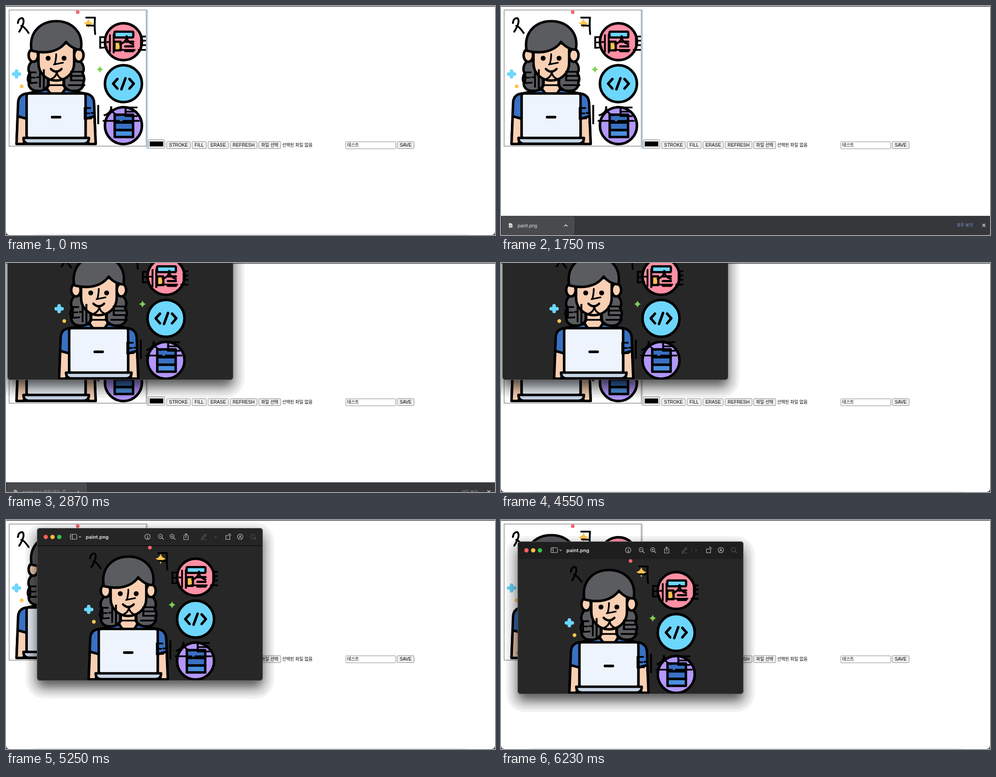
An HTML page that plays this animation: 1091 px wide and 513 px high, repeating every 6720 ms.

```html
<!DOCTYPE html>
<html lang="ko">
<head>
<meta charset="utf-8">
<title>Paint board</title>
<style>
html, body { margin: 0; width: 100%; height: 100%; overflow: hidden; background: #fff; }
svg { display: block; width: 1091px; height: 513px; }
text { font-family: "Liberation Sans", "Noto Sans CJK KR", sans-serif; }
.ko { font-family: "Noto Sans CJK KR", "Noto Sans CJK", sans-serif; }
.ui { font-family: Inter, "Noto Sans CJK KR", sans-serif; }
.line { fill: none; stroke-linecap: round; stroke-linejoin: round; }
</style>
</head>
<body>
<svg id="stage" viewBox="0 0 1091 513"></svg>
<script>
const LOOP = 6720, STEP = 70;
const SKIN = '#f9d0b4', HAIR = '#5b5c60', BLUE = '#3971c3', CYAN = '#6dd6fd', YELLOW = '#ffc350';
const W = 504, H = 342;

const rect = (x, y, w, h, fill, extra = '') =>
  `<rect x="${x}" y="${y}" width="${w}" height="${h}" fill="${fill}" ${extra}/>`;
const dot = (x, y, r, fill, extra = '') => `<circle cx="${x}" cy="${y}" r="${r}" fill="${fill}" ${extra}/>`;
const shape = (d, fill) => `<path d="${d}" fill="${fill}"/>`;
const line = (d, width, color = '#000') =>
  `<path class="line" d="${d}" stroke="${color}" stroke-width="${width}"/>`;
const text = (x, y, size, str, cls = '', extra = '') =>
  `<text x="${x}" y="${y}" font-size="${size}" class="${cls}" ${extra}>${str}</text>`;
const mirror = s => s + `<g transform="matrix(-1 0 0 1 223.5 0)">${s}</g>`;
const sparkle = (x, y, r, fill) =>
  shape(`M${x} ${y - r}Q${x + r * .2} ${y - r * .2} ${x + r} ${y}Q${x + r * .2} ${y + r * .2} ${x} ${y + r}` +
    `Q${x - r * .2} ${y + r * .2} ${x - r} ${y}Q${x - r * .2} ${y - r * .2} ${x} ${y - r}Z`, fill);

function drawArt() {
  const person = `<g stroke="#000" stroke-width="5.600" stroke-linejoin="round" stroke-linecap="round">` +
    shape('M23.500 309L27 216Q28 197 50 195.500L88 187H135L173 195.500Q195 197 196.500 216L200 309Z', BLUE) +
    mirror(
      shape('M26 247L46 252.500V296L38 309H23.500Z', SKIN) +
      shape('M62 122C49 128 48 144 53 150C48 158 48 166 51 171C49 183 60 191 70 190C80 192 90 186 94 178V124Z', HAIR)) +
    shape('M95 160V178L91 184Q97 196 104 199H120Q127 196 132.500 184L128.500 178V160Z', SKIN) +
    mirror(`<ellipse cx="61" cy="110.500" rx="10.500" ry="14.500" fill="${SKIN}"/>`) +
    shape('M72.500 98V128C72.500 152 92 167 111.700 167C132 167 152 152 152 128V90L112 75Z', SKIN) +
    shape('M57 100C50 57 79 34 112 34C145 34 174 57 167 98Q148 97 134 80.500C118 103 88 108 57 100Z', HAIR) +
    rect(46, 196, 131.500, 100, '#eef4fe', 'rx="5"') +
    line('M103 249H120.500', 6) +
    shape('M39 295.500H185Q185 308.500 173 308.500H51Q39 308.500 39 295.500Z', '#c7d5e6') + '</g>' +
    mirror(dot(94, 117, 5.500, '#000')) +
    line('M100 141Q112 153 124 141', 5) +
    line('M112 108Q112 118 109 130M107 131L127 127', 3.800);

  const badge = (y, fill) => dot(262, y, 41.300, fill, 'stroke="#000" stroke-width="5.800"');
  const icons =
    badge(80, '#ff8fa4') +
    `<g stroke="#000" stroke-width="5">` + rect(242, 57.500, 42, 13, CYAN, 'rx="2"') +
    rect(242, 80, 14, 19.500, YELLOW, 'rx="1"') + '</g>' +
    line('M266 80H284M266 90.500H284M266 101H284', 5) +
    badge(174, CYAN) +
    line('M248.500 163.500L239 174L248.500 185M266.500 162L257.500 186.500M275.500 163.500L285 174L275.500 185', 5.600) +
    badge(268, '#b397fb') +
    `<g stroke="#000" stroke-width="5.500" stroke-linejoin="round">` +
    rect(242.500, 243.500, 41, 17.500, BLUE) + rect(242.500, 261, 41, 17, BLUE) +
    rect(242.500, 278, 41, 15.500, '#4b8fdd') + '</g>';

  const bits =
    dot(160, 13.700, 4.200, '#f4646f') + dot(35, 180, 4.200, YELLOW) +
    sparkle(184, 39, 11.500, YELLOW) + sparkle(209.500, 142, 8, '#7fd152') +
    line('M23.500 146V158.500M17 152.500H30', 8, CYAN);

  const scrawl =
    line('M26.500 38L28 32Q31 27 36 27Q40 29 39 37Q36 48 29.500 57.500M34 44.500Q40 45 50.500 60.500', 4.200) +
    line('M179 26H198.500Q197 45 199 63M180.500 43.500L195 44', 4.200);
  const words = [[48.500, 180], [204.500, 101], [170, 260]]
    .map(([x, y]) => text(x, y, 46, '테스트', 'ko', 'letter-spacing="1.500" stroke="#000" stroke-width=".6"')).join('');
  return bits + person + icons + scrawl + words;
}

function button(x, w, label, id = '') {
  const ko = /[가-힣]/.test(label);
  return rect(x, 303.800, w, 15.700, '#efefef', `rx="2" stroke="#767676" stroke-width=".9" id="${id}"`) +
    text(x + w / 2, 315.100, ko ? 9.700 : 10.200, label, ko ? 'ko' : '', 'text-anchor="middle"');
}

function drawPage() {
  return rect(0, 0, 1091, 513, '#fff') + rect(0, 0, 1091, 1.500, '#48484a') +
    rect(313, 8, 3.800, 312, '#b9d6f2', 'id="strip"') +
    rect(7, 9, 306, 305, '#fff', 'stroke="#aaa" stroke-width="2"') +
    '<use href="#art" clip-path="url(#board)"/>' +
    rect(317.300, 299.500, 37, 19.500, '#efefef', 'rx="2" stroke="#767676" stroke-width=".9"') +
    rect(320.800, 303.600, 30, 11, '#000', 'stroke="#777" stroke-width=".8"') +
    button(358.300, 53, 'STROKE') + button(415.200, 31.700, 'FILL') +
    button(450.700, 45.500, 'ERASE', 'erase') + button(500.200, 60, 'REFRESH') +
    button(563.700, 49.300, '파일 선택') + text(616, 315.100, 9.700, '선택된 파일 없음', 'ko') +
    rect(758.300, 304.200, 111, 15.700, '#fff', 'rx="1" stroke="#767676" stroke-width=".9"') +
    text(761, 315.100, 9.700, '테스트', 'ko') + button(872.700, 37.800, 'SAVE');
}

function drawShelf() {
  return rect(0, 470, 1091, 43, '#35373b') + rect(0, 470, 1091, .8, '#4b4d51') +
    rect(2, 471, 160, 42, '#484a4e', 'id="hover"') +
    `<g id="file">` + shape('M17.500 486.500H22.500L25.500 489.500V496.500H17.500Z', '#dfe1e5') +
    line('M19.500 491.500H23.500M19.500 494H23.500', .9, '#5f6368') + '</g>' +
    dot(21.500, 491.500, 9.500, 'none', 'id="ring" stroke="#8ab4f8" stroke-width="1.600"') +
    text(37, 495.500, 9.800, 'paint.png', 'ui', 'id="name" fill="#e8eaed"') +
    `<g id="more">` + line('M141.500 493.500L144.800 490L148.100 493.500', 1.300, '#e8eaed') +
    rect(162, 475, 1, 34, '#5f6368') + '</g>' +
    text(1017, 494.300, 9, '모두 보기', 'ko', 'id="all" font-weight="500"') +
    line('M1074.300 488.300L1080.300 494.300M1080.300 488.300L1074.300 494.300', 1.400, '#e8eaed');
}

function drawTools() {
  const on = '#c9c9c9', off = '#5c5c5c';
  const lens = (x, c) => dot(x - 1, 18.500, 4.600, 'none', `stroke="${c}" stroke-width="1.100"`) +
    line(`M${x + 2.500} 22L${x + 6} 25.500`, 1.400, c);
  const ring = x => dot(x, 19.500, 6, 'none', `stroke="${on}" stroke-width="1.100"`);
  return dot(19.700, 20, 4.800, '#fc605c') + dot(34.800, 20, 4.800, '#fdbc40') + dot(49.900, 20, 4.800, '#34c648') +
    rect(74.500, 14, 14.500, 11, 'none', `rx="2" stroke="${on}" stroke-width="1.100"`) +
    line('M79.500 14V25M76.300 17H77.500M76.300 19.500H77.500', 1, on) + line('M93.800 18.800L96 21L98.200 18.800', 1.100, on) +
    text(109, 24, 11, 'paint.png', 'ui', 'fill="#ececec" font-weight="600"') +
    ring(246.700) + line('M246.200 18.800H247V22.700M245.500 22.700H248.500M246.700 16.300V16.400', 1.100, on) +
    lens(276.500, on) + line('M273.500 18.500H277.500', 1, on) +
    lens(302.500, on) + line('M299.500 18.500H303.500M301.500 16.500V20.500', 1, on) +
    line('M330 17H327.800V26H337.500V17H335.300M332.600 22V12.500M330 15L332.600 12.300L335.200 15', 1.100, on) +
    line('M367 24.500L368 21.500L376 13.500L378 15.500L370 23.500ZM366 26H378', 1.100, off) +
    line('M396.500 18.800L398.700 21L400.900 18.800', 1.100, off) +
    rect(421.500, 17, 9, 8.500, 'none', `stroke="${on}" stroke-width="1.100"`) +
    line('M428 13.500H431Q433 14 433 17M429.500 12L428 13.500L429.500 15', 1, on) +
    ring(453.500) + line('M451 22.500L453.500 15.800L456 22.500M452 20.500H455', 1, on) +
    lens(482.500, off);
}

function drawWindow() {
  return rect(-25, -12, W + 50, H + 52, '#000', 'rx="42" opacity=".045"') +
    rect(-18, -5, W + 36, H + 38, '#000', 'rx="34" opacity=".03"') +
    rect(0, 15, W, H, '#000', 'rx="10" opacity=".62" filter="url(#soft)"') +
    rect(0, 0, W, H, '#272727', 'rx="7"') +
    `<path id="head" d="M0 39.500V7Q0 0 7 0H${W - 7}Q${W} 0 ${W} 7V39.500Z"/>` +
    rect(0, 39, W, 1, '#000', 'id="rule"') + drawTools() +
    rect(388, 13, 1, 13, '#3c3c3c', 'id="split"') +
    '<g clip-path="url(#frame)"><g transform="translate(92 30)"><use href="#art" clip-path="url(#board)"/></g></g>' +
    rect(.5, .5, W - 1, H - 1, 'none', 'rx="7" stroke="#5c5c5c" stroke-width="1"');
}

document.getElementById('stage').innerHTML =
  `<defs><g id="art">${drawArt()}</g>` +
  `<clipPath id="board">${rect(8, 10, 304, 303, '#000')}</clipPath>` +
  `<clipPath id="frame">${rect(0, 0, W, H, '#000', 'rx="7"')}</clipPath>` +
  '<filter id="soft" x="-20%" y="-20%" width="140%" height="140%"><feGaussianBlur stdDeviation="12"/></filter></defs>' +
  drawPage() + `<g id="shelf">${drawShelf()}</g>` +
  `<g id="drop">${dot(0, 0, 27, '#a8a8aa')}${shape('M-4 -11H4V-2H10L0 9L-10 -2H-4Z', '#3f6fb5')}</g>` +
  `<g id="win">${drawWindow()}</g>` +
  rect(40, 510, 1011, 40, '#000', 'rx="36" opacity=".05"') +
  shape('M0 504Q0 513 9 513H0ZM1091 504Q1091 513 1082 513H1091Z', '#48484a');

const el = {};
for (const node of document.querySelectorAll('[id]')) el[node.id] = node;
const set = (id, attrs) => { for (const k in attrs) el[id].setAttribute(k, attrs[k]); };
const show = (id, on) => set(id, { visibility: on ? 'inherit' : 'hidden' });
const clamp = v => Math.min(1, Math.max(0, v));
const span = (t, a, b) => clamp((t - a) / (b - a));
const smooth = v => v * v * (3 - 2 * v);

// Window drag: time, left, top
const drag = [[4760, 3, -80], [4970, 10, -77], [5040, 36, -64], [5110, 61, -45], [5180, 74, -15],
  [5250, 69, 18], [5320, 56, 40], [5390, 44, 50], [5460, 39, 49], [5530, 37, 48]];

function place(t) {
  const i = drag.findIndex(k => k[0] > t);
  if (i === 0) return drag[0].slice(1);
  if (i < 0) return drag[drag.length - 1].slice(1);
  const a = drag[i - 1], b = drag[i], p = span(t, a[0], b[0]);
  return [a[1] + (b[1] - a[1]) * p, a[2] + (b[2] - a[2]) * p];
}

function render(ms) {
  const t = Math.floor((ms % LOOP) / STEP + 1e-6) * STEP;
  const away = t >= 1890, hovered = t >= 1260;

  const up = smooth(span(t, 70, 350)) - span(t, 2730, 3010);
  show('shelf', up > 0);
  set('shelf', { transform: `translate(0 ${43 * (1 - up)})` });

  const fall = span(t, 240, 840);
  set('drop', {
    transform: `translate(27 ${429 + 54 * fall})`,
    opacity: Math.max(0, 1 - 4 * (fall - .5) ** 2)
  });

  const pulsing = t >= 840 && t <= 1680;
  set('ring', { opacity: pulsing ? .35 - .35 * Math.cos((t - 770) / 490 * 2 * Math.PI) : 0 });
  set('hover', { width: away ? 177 : 160 });
  show('hover', hovered);
  set('more', { transform: `translate(${away ? 16.500 : 0} 0)` });
  set('file', { opacity: away ? .6 : 1 });
  set('name', { fill: away ? '#a4a7ab' : '#e8eaed' });
  el.name.textContent = away ? 'paint.png 파일 여는 중...' : 'paint.png';
  set('all', { fill: away ? '#9aa0a6' : '#8ab4f8' });
  set('strip', { fill: away ? '#d6d6d6' : '#b9d6f2' });

  const over = t >= 980 && t < 1120;
  set('erase', { fill: over ? '#e5e5e5' : '#efefef', stroke: over ? '#4f4f4f' : '#767676' });

  const [x, y] = place(t);
  const size = .49 + .51 * smooth(span(t, 1960, 2380));
  show('win', t >= 1960);
  set('win', {
    transform: `translate(${x + W / 2} ${y + H / 2}) scale(${size}) translate(${-W / 2} ${-H / 2})`,
    opacity: span(t, 1900, 2250)
  });
  const settled = t >= 5530;
  set('head', { fill: settled ? '#1e1e1e' : '#252525' });
  show('rule', !settled);
  show('split', settled);
}

let start;
function tick(now) {
  if (start === undefined) start = now;
  render(now - start);
  requestAnimationFrame(tick);
}
render(0);
requestAnimationFrame(tick);
</script>
</body>
</html>
```
